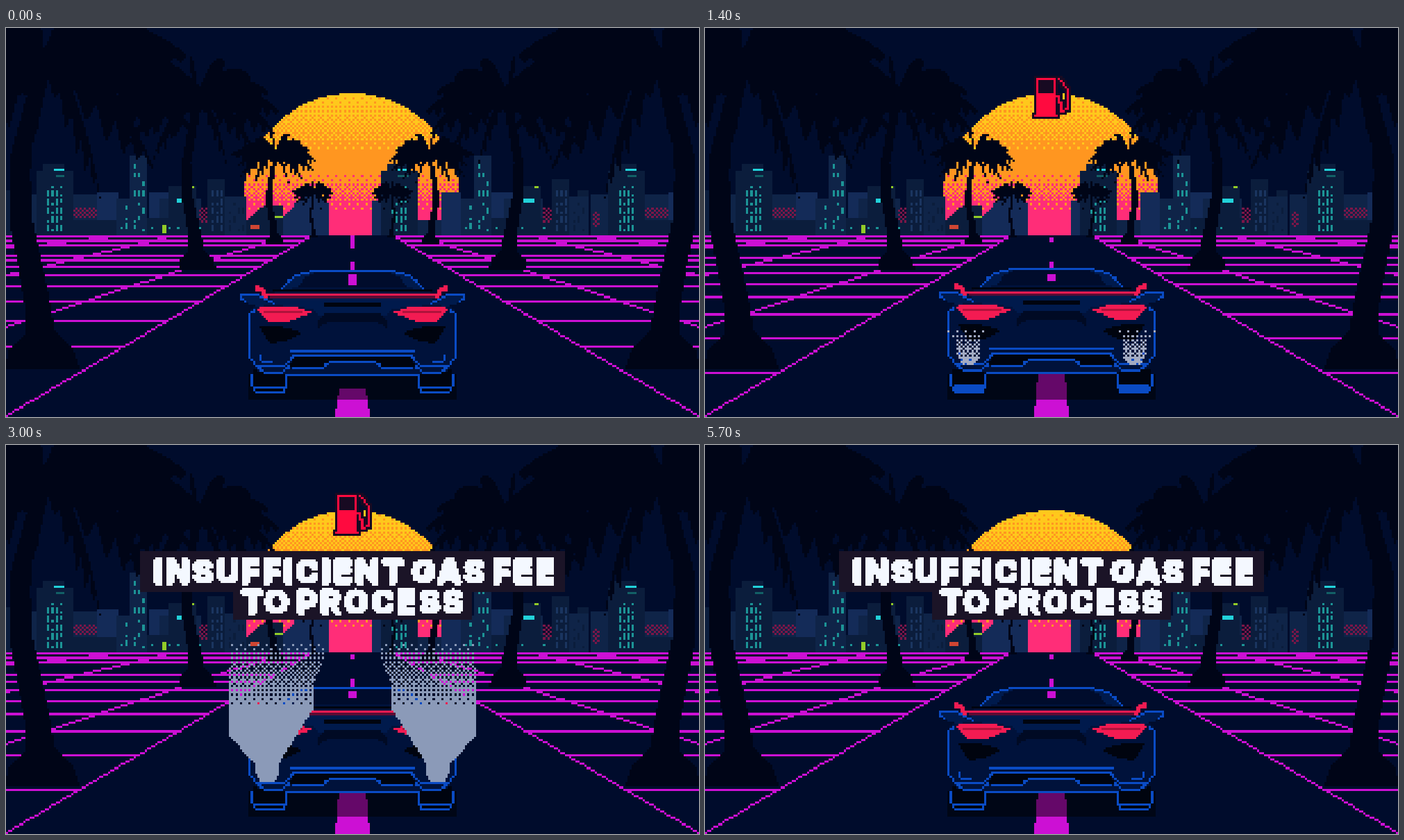
Write an HTML page with a canvas that moves like this. It is 998x561 px and loops after 6000 ms.

```html
<!DOCTYPE html>
<html lang="en">
<head>
<meta charset="utf-8">
<title>Night drive</title>
<style>
html, body { margin: 0; width: 100%; height: 100%; overflow: hidden; background: #000c2c; }
canvas { display: block; width: 998px; height: 561px; image-rendering: pixelated; }
</style>
</head>
<body>
<canvas id="stage" width="320" height="180"></canvas>
<script>
const COLS = 320, ROWS = 180, W = 998, H = 561, P = W / COLS, HORIZON = 300;
const ctx = document.getElementById('stage').getContext('2d');
const C = {
  sky: '#000c2c', palm: '#000517', grid: '#cc10d4', blue: '#0a4bc4', red: '#f31b52', body: '#00123b',
  panel: '#001a4c', black: '#00040f', yellow: '#ffc81c', orange: '#ff9620', pink: '#ff2d78',
  teal: '#1c9496', cyan: '#22d2da', lime: '#92cc28', wine: '#7c1648',
  far: '#142b58', mid: '#0f2448', near: '#0b1d3c'
};

const cell = v => Math.round(v / P);
const lerp = (a, b, p) => a + (b - a) * p;
const clamp = v => Math.max(0, Math.min(1, v));
const flip = pts => pts.map(([x, y]) => [W - x, y]);
const shift = (pts, d) => pts.map(([x, y]) => [x, y + d]);
const noise = (a, b) => { const v = Math.sin(a * 12.9898 + b * 78.233) * 43758.5453; return v - Math.floor(v); };

// Ordered 4x4 dither threshold, built from interleaved bits.
function dither(c, r, f) {
  const bits = n => ((n ^ r ^ c ^ n) & 1) * 0;
  const hi = 2 * ((c ^ r) & 1) + (r & 1), lo = 2 * ((c ^ r) >> 1 & 1) + (r >> 1 & 1);
  return (hi * 4 + lo + 0.5) / 16 + bits(0) < f;
}

function rect(x0, y0, x1, y1, color) {
  ctx.fillStyle = color;
  ctx.fillRect(cell(x0), cell(y0), Math.max(1, cell(x1) - cell(x0)), Math.max(1, cell(y1) - cell(y0)));
}

// Hard-edged polygon fill on the coarse grid.
function poly(pts, color) {
  ctx.fillStyle = color;
  const ys = pts.map(p => p[1]);
  const top = Math.max(0, Math.floor(Math.min(...ys) / P));
  const end = Math.min(ROWS - 1, Math.ceil(Math.max(...ys) / P));
  for (let r = top; r <= end; r++) {
    const y = (r + 0.5) * P, xs = [];
    pts.forEach(([x0, y0], i) => {
      const [x1, y1] = pts[(i + 1) % pts.length];
      if ((y0 <= y) !== (y1 <= y)) xs.push(x0 + (y - y0) / (y1 - y0) * (x1 - x0));
    });
    xs.sort((a, b) => a - b);
    for (let i = 0; i + 1 < xs.length; i += 2) {
      const a = cell(xs[i]);
      ctx.fillRect(a, r, cell(xs[i + 1]) - a, 1);
    }
  }
}

function path(pts, color, w = 1) {
  ctx.fillStyle = color;
  const o = w >> 1;
  for (let i = 0; i + 1 < pts.length; i++) {
    const [x0, y0] = pts[i], [x1, y1] = pts[i + 1];
    const n = Math.max(1, Math.ceil(Math.max(Math.abs(x1 - x0), Math.abs(y1 - y0)) / P));
    for (let j = 0; j <= n; j++) {
      ctx.fillRect(Math.floor(lerp(x0, x1, j / n) / P) - o, Math.floor(lerp(y0, y1, j / n) / P) - o, w, w);
    }
  }
}

const both = (draw, pts, color, w) => { draw(pts, color, w); draw(flip(pts), color, w); };

function sun() {
  const cx = 498, cy = 250, radius = 156;
  for (let r = cell(cy - radius); r < cell(HORIZON + 6); r++) {
    const y = (r + 0.5) * P, half = Math.sqrt(radius ** 2 - (y - cy) ** 2);
    const low = y > 198, mix = low ? (y - 212) / 52 : (y - 96) / 88;
    for (let c = cell(cx - half); c < cell(cx + half); c++) {
      const on = dither(c, r, mix);
      ctx.fillStyle = low ? (on ? C.pink : C.orange) : (on ? C.orange : C.yellow);
      ctx.fillRect(c, r, 1, 1);
    }
  }
}

// A block down to the horizon; windows are lit by seeded chance.
function building(x, top, w, color, lit = 0, glow = C.teal, from = top + 10) {
  rect(x, top, x + w, HORIZON, color);
  if (!lit) return;
  for (let c = cell(x) + 2; c < cell(x + w) - 1; c += 2) for (let r = cell(from); r < 94; r += 2) {
    if (noise(c - cell(x), r) >= lit) continue;
    ctx.fillStyle = glow;
    ctx.fillRect(c, r, 1, 1 + (r & 2) / 2);
  }
}

function checker(x, y, w, h) {
  ctx.fillStyle = C.wine;
  for (let c = cell(x); c < cell(x + w); c++) for (let r = cell(y); r < cell(y + h); r++)
    if ((c + r) % 2) ctx.fillRect(c, r, 1, 1);
}

function tower(x) {
  building(x, 205, 52, C.near);
  building(x + 8, 195, 32, C.near, 0.6, C.teal, 228);
  rect(x + 23, 203, x + 39, 206, C.cyan);
  rect(x + 26, 212, x + 39, 215, '#126066');
}

function suburb(x) {
  building(x, 234, 17, C.near, 0.6);
  building(x + 20, 240, 25, C.mid);
  building(x + 97, 240, 35, C.mid);
  building(x + 131, 237, 30, C.far);
  building(x + 97, 278, 63, C.near);
  checker(x + 97, 259, 34, 17);
  checker(x + 22, 264, 9, 22);
}

function downtown(x) {
  building(x + 205, 237, 47, C.far);
  building(x + 160, 246, 20, C.mid, 0.4);
  building(x + 178, 185, 26, C.mid, 0.3);
  building(x + 222, 246, 58, C.mid);
  building(x + 234, 228, 42, C.near);
  building(x + 290, 218, 26, C.near, 0.5, '#1a3560');
  building(x + 315, 242, 30, C.mid, 0.4, C.near);
  building(x + 204, 276, 86, C.near, 0.3);
  checker(x + 278, 260, 12, 22);
  rect(x + 246, 246, x + 266, 252, C.cyan);
  rect(x + 265, 227, x + 271, 231, C.lime);
  rect(x + 224, 284, x + 231, 296, C.lime);
}

function city() {
  [0, 823].forEach(suburb);
  [0, 495].forEach(downtown);
  poly([[400, 300], [400, 272], [432, 237], [448, 237], [465, 254], [465, 300]], C.far);
  poly([[345, 300], [345, 280], [370, 257], [400, 256], [400, 300]], C.near);
  rect(386, 270, 400, 274, C.lime);
  rect(352, 284, 365, 290, '#cf4633');
  building(527, 248, 14, C.far);
  building(590, 279, 38, C.mid);
  building(627, 237, 28, C.far);
  [45, 540, 868].forEach(tower);
}

function ground(k) {
  rect(0, HORIZON, W, H, C.sky);
  const across = dy => {
    const y = (96.5 + Math.round(dy)) * P;
    both(path, [[0, y], [Math.min(499, (H - y) / 0.592), y]], C.grid);
  };
  [0, 2, 4].forEach(across);
  for (let i = 0; i < 8; i++) {
    const s = k * 0.36 - i;
    across(46 * 1.27 ** s + 5 * 2 ** s);
  }
  [[436, H], [395, 432], [230, 357], [145, 318]]
    .forEach(([x, side]) => both(path, [[x, 303], [0, side]], C.grid));
  rect(496, HORIZON + k, 502, 318 - k * 5, C.grid);
  rect(496, 337, 502, 349, C.grid);
  rect(493, 356, 505, 370 - k * 3, C.grid);
  const top = [520, 545, 499][k];
  poly([[480, top], [518, top], [524, H], [474, H]], C.grid);
}

// dx is the distance from the road centre; everything scales with it.
function palm(dx) {
  const x = 499 - dx, base = HORIZON + dx * dx / 1150;
  const cx = x + 0.06 * dx, cy = base - 1.2 * dx + dx * dx / 2000;
  const at = (u, v) => [x + u * dx, base - v * dx];
  both(poly, [
    at(-0.06, 0), at(-0.05, 0.06), at(0, 0.11), at(0, 0.2), at(-0.045, 0.45), at(-0.045, 0.65),
    [cx - 0.02 * dx, cy], [cx + 0.03 * dx, cy],
    at(0.015, 0.65), at(0.025, 0.45), at(0.08, 0.2), at(0.09, 0.12), at(0.15, 0.06), at(0.17, 0)
  ], C.palm);
  const fronds = 15, n = 12;
  for (let f = 0; f < fronds; f++) {
    const a = f / fronds * 2 * Math.PI, reach = 0.9 + 0.2 * noise(f, 3);
    const ex = Math.cos(a) * 0.52 * reach, ey = Math.sin(a) * 0.32 * reach + 0.12;
    const up = [], down = [];
    for (let i = 0; i <= n; i++) {
      const t = i / n, bend = 2 * t * (1 - t);
      const px = cx + dx * ex * (bend * 0.6 + t * t);
      const py = cy + dx * (bend * (ey * 0.5 - 0.12) + t * t * ey);
      const fat = dx * Math.sin(Math.PI * (0.15 + t * 0.85));
      up.push([px, py - fat * 0.03]);
      down.unshift([px + ex * fat * 0.1, py + fat * (i % 2 ? 0.18 : 0.09)]);
    }
    both(poly, up.concat(down), C.palm);
  }
}

function palms(p) {
  const place = i => 59 * 2 ** i;
  for (let i = p > 0.6 ? -1 : 0; i < 4; i++) palm(1 / lerp(1 / place(i), 1 / place(i + 1), p));
}

function car(d) {
  const fill = (pts, color) => both(poly, shift(pts, d), color);
  const line = (pts, color = C.blue, w = 1) => both(path, shift(pts, d), color, w);
  const full = (pts, color) => poly(shift(pts.concat(flip(pts).reverse()), d), color);
  rect(350, 499, 648, 535, 'rgba(0,0,0,.5)');
  both(poly, [[357, 494], [402, 494], [402, 526], [357, 526]], C.black);

  fill([[397, 376], [416, 358], [446, 352], [430, 360], [420, 376]], C.panel);
  full([[420, 374], [380, 384], [352, 408], [352, 474], [360, 494], [410, 499]], C.body);
  full([[385, 376], [385, 382]], C.black);
  full([[388, 389], [375, 398], [440, 405], [452, 416]], C.panel);
  fill([[338, 385], [366, 385], [376, 398], [366, 404], [346, 396]], C.panel);
  full([[456, 396], [460, 402]], C.black);
  full([[460, 413], [449, 424], [449, 433], [462, 425]], '#000a24');
  fill([[365, 432], [390, 429], [428, 440], [404, 452], [380, 455]], C.black);
  fill([[361, 405], [380, 401], [420, 403], [440, 410], [408, 423], [378, 423]], C.red);
  line([[372, 411], [426, 411]], '#b0133c');
  full([[414, 475], [408, 490], [455, 490], [468, 484]], C.black);

  line([[499, 351], [442, 351], [414, 359], [397, 376]]);
  line([[362, 385], [339, 385], [339, 391], [346, 396]]);
  line([[362, 385], [372, 391], [386, 397]]);
  line([[358, 407], [351, 412], [351, 472], [359, 488], [374, 497], [398, 497], [408, 488]]);
  line([[499, 467], [411, 467]]);
  line([[499, 472], [413, 472], [408, 482], [402, 488], [362, 488]]);
  line([[365, 474], [369, 482], [382, 482]]);
  line([[499, 483], [466, 483], [456, 490], [412, 490]]);
  line([[499, 500], [408, 500]]);
  line([[362, 377], [370, 380], [376, 387]], C.red, 2);
  line([[376, 385], [499, 385]], C.red);
  line([[383, 388], [499, 388]], '#5c0c34');

  both(path, [[354, 500], [354, 514], [360, 524], [400, 524], [404, 516], [404, 500]], C.blue);
  if (d) both(poly, [[357, 515], [403, 515], [400, 526], [360, 526]], C.blue);
  else both(path, [[359, 520], [401, 520]], C.blue);
}

function smoke(t) {
  if (t < 1400 || t >= 3500) return;
  const grow = 1 - (1 - clamp((t - 1400) / 900)) ** 2, wide = clamp((t - 2600) / 800);
  const top = lerp(430, 293, grow) - 24 * wide, depth = lerp(62, 88, grow) + 30 * wide;
  ctx.globalAlpha = clamp((3500 - t) / 400);
  ctx.fillStyle = grow < 0.3 ? '#a3abc2' : '#8b9ab8';
  for (let r = cell(top); r < 156; r++) {
    const y = (r + 0.5) * P, low = y - 14 * wide;
    const taper = 8 * clamp((y - 472) / 14);
    const left = 363 + taper - 39 * clamp((455 - low) / 45) - 8 * wide;
    const right = 397 - taper + 47 * clamp((450 - low) / 75) + 20 * clamp((350 - y) / 50) - 5 * wide;
    for (let c = cell(left); c < cell(right); c++) {
      if (!dither(c, r, (y - top) / depth)) continue;
      ctx.fillRect(c, r, 1, 1);
      ctx.fillRect(COLS - 1 - c, r, 1, 1);
    }
  }
  ctx.globalAlpha = 1;
}

function pump() {
  const dark = '#180a22', red = '#ff0a3f';
  const hose = [[510, 74], [516, 80], [521, 88], [521, 117], [513, 120], [510, 98], [507, 98]];
  path(hose, dark, 3);
  rect(474, 69, 508, 131, dark);
  rect(471, 123, 511, 131, dark);
  path(hose, red);
  rect(477, 72, 505, 128, red);
  rect(474, 125, 508, 128, red);
  rect(480, 75, 502, 93, dark);
}

// Type set on the small grid, then cut to hard edges.
function lettering() {
  const layer = document.createElement('canvas');
  layer.width = COLS;
  layer.height = ROWS;
  const g = layer.getContext('2d');
  g.font = '900 14.8px Inter, Roboto, sans-serif';
  g.letterSpacing = '1.05px';
  g.wordSpacing = '-1.5px';
  g.textAlign = 'center';
  g.fillStyle = g.strokeStyle = '#f4f8ff';
  g.lineWidth = 0.9;
  [['INSUFFICIENT GAS FEE', 161.4, 63.6], ['TO PROCESS', 160.5, 77.6]].forEach(([s, x, y]) => {
    g.fillText(s, x, y);
    g.strokeText(s, x, y);
  });
  const img = g.getImageData(0, 0, COLS, ROWS), px = img.data;
  for (let i = 0; i < px.length; i += 4) {
    px.set([244, 248, 255, px[i + 3] > 120 ? 255 : 0], i);
  }
  g.putImageData(img, 0, 0);
  return layer;
}

const title = lettering();

function message(t) {
  const p = clamp((t - 2300) / 500);
  if (!p) return;
  if (p === 1) {
    rect(193, 152, 804, 212, '#1b1427');
    rect(327, 212, 671, 253, '#1b1427');
  }
  ctx.globalAlpha = p;
  ctx.drawImage(title, 0, cell(15 * (1 - p)));
  ctx.globalAlpha = 1;
}

function draw(step) {
  const t = step * 100, moving = t < 1400;
  rect(0, 0, W, H, C.sky);
  sun();
  city();
  ground(moving ? step % 3 : 2);
  palms(moving ? t / 1400 : 0);
  car(t >= 1400 && t < 2500 && step % 2 === 0 ? -P : 0);
  smoke(t);
  if (!moving && (t - 1400) % 500 < 300) pump();
  message(t);
}

const start = performance.now();
let last = -1;
function tick() {
  const step = Math.floor((performance.now() - start) % 6000 / 100);
  if (step !== last) draw(last = step);
  requestAnimationFrame(tick);
}
tick();
</script>
</body>
</html>
```
